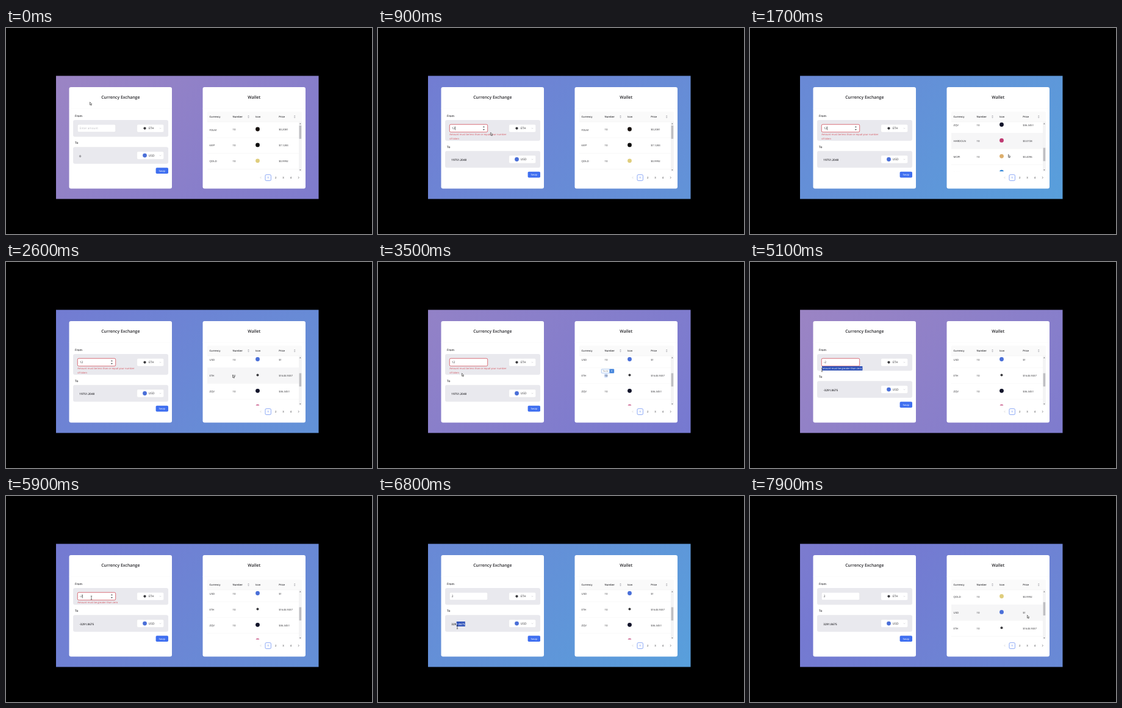
An HTML page with a canvas for the animation above (8000 ms loop, 600 px wide and 338 px high).

```html
<!DOCTYPE html>
<html lang="en">
<head>
<meta charset="utf-8">
<title>Currency Exchange</title>
<style>
html, body { margin: 0; width: 100%; height: 100%; overflow: hidden; background: #000; }
canvas { display: block; width: 600px; height: 338px; }
</style>
</head>
<body>
<canvas id="stage"></canvas>
<script>
const canvas = document.getElementById('stage');
const ctx = canvas.getContext('2d');
const dpr = window.devicePixelRatio || 1;
canvas.width = 600 * dpr;
canvas.height = 338 * dpr;

const LOOP = 8000, RATE = 1645.93373, ROW = 25.9;
const INK = '#2b2b2f', RED = '#d4505a', BLUE = '#3f6ff0', MARK = '#2f52b8';
const FONT = '"Open Sans", "Noto Sans", sans-serif';

// name, price, icon colour
const coins = [
  ['FOLM', '$0.2081', '#17100d'],
  ['kVIP', '$7.1283', '#0c0c0c'],
  ['QOLD', '$0.9992', '#dfcd7c'],
  ['USD', '$1', '#4a6fd8'],
  ['ETH', '$1645.9337', '#3a3a3e'],
  ['ZQV', '$36.3451', '#12142a'],
  ['HARDOLN', '$0.0728', '#bf3a72'],
  ['MOPI', '$0.4096', '#dcae6c'],
  ['TARV', '$0.5120', '#3487d6'],
  ['WIBEK', '$1.2040', '#6a6a78']
];

// time, x, y
const pointer = [
  [0, 138, 124], [120, 138, 124], [350, 140, 165], [800, 140, 167], [1200, 424, 210],
  [2400, 424, 210], [2620, 371, 187], [2760, 377, 187], [2950, 377, 187], [3450, 138, 185],
  [3550, 138, 185], [3800, 142, 166], [4450, 142, 166], [4700, 184, 175], [5060, 118, 177],
  [5200, 118, 177], [5650, 140, 167], [6120, 140, 167], [6400, 143, 211], [6780, 130, 215],
  [7080, 130, 215], [7550, 455, 198], [8000, 455, 198]
];
const scrolls = [[0, 0], [1250, 0], [1700, 137], [1950, 137], [2350, 84.2],
  [7580, 84.2], [7760, 53.3], [8000, 53.3]];
const typed = [[0, ''], [520, '1'], [620, '12'], [3950, '1'], [4050, ''],
  [4220, '-'], [4350, '-2'], [6050, '2']];
// click, last key, leave
const focuses = [[370, 620, 2640], [3820, 4350, 4700], [5700, 5700, 6400]];

function bezierEase(x) {
  let lo = 0, hi = 1, s = 0.5;
  for (let i = 0; i < 20; i++) {
    s = (lo + hi) / 2;
    const bx = 0.75 * s * (1 - s) ** 2 + 0.75 * s * s * (1 - s) + s ** 3;
    if (bx < x) lo = s; else hi = s;
  }
  return 0.3 * s * (1 - s) ** 2 + 3 * s * s * (1 - s) + s ** 3;
}

function track(keys, t, col, ease = k => k) {
  let i = 0;
  while (i < keys.length - 2 && t >= keys[i + 1][0]) i++;
  const a = keys[i], b = keys[i + 1];
  const k = Math.min(1, Math.max(0, (t - a[0]) / (b[0] - a[0])));
  return a[col] + (b[col] - a[col]) * ease(k);
}

const smooth = k => k * k * (3 - 2 * k);
const scrollAt = t => track(scrolls, t, 1);
const between = (t, a, b) => t >= a && t < b;

function box(x, y, w, h, r, fill, stroke, lw = 0.6) {
  ctx.beginPath();
  ctx.roundRect(x, y, w, h, r);
  if (fill) { ctx.fillStyle = fill; ctx.fill(); }
  if (stroke) { ctx.strokeStyle = stroke; ctx.lineWidth = lw; ctx.stroke(); }
}

function dot(x, y, r, color) {
  ctx.beginPath();
  ctx.arc(x, y, r, 0, Math.PI * 2);
  ctx.fillStyle = color;
  ctx.fill();
}

function text(s, x, y, size, color = INK, weight = 400, align = 'left') {
  ctx.font = `${weight} ${size}px ${FONT}`;
  ctx.textAlign = align;
  ctx.fillStyle = color;
  ctx.fillText(s, x, y + size * 0.355);
  return ctx.measureText(s).width;
}

function line(points, color, lw = 0.6) {
  ctx.beginPath();
  points.forEach(([x, y], i) => i ? ctx.lineTo(x, y) : ctx.moveTo(x, y));
  ctx.strokeStyle = color;
  ctx.lineWidth = lw;
  ctx.stroke();
}

// filled triangle, d = -1 up, 1 down
function arrow(x, y, r, d, color) {
  ctx.beginPath();
  ctx.moveTo(x - r, y - d * r * 0.5);
  ctx.lineTo(x + r, y - d * r * 0.5);
  ctx.lineTo(x, y + d * r * 0.7);
  ctx.fillStyle = color;
  ctx.fill();
}

function backdrop(t) {
  ctx.fillStyle = '#000';
  ctx.fillRect(0, 0, 600, 338);
  const p = t % 5100;
  const blue = p < 2100 ? bezierEase(p / 2100) : 1 - bezierEase(Math.min(1, (p - 2100) / 2500));
  const w = 430.5, h = 202, d = w + h;
  const cx = 82 + w * 2 - blue * w * 3, cy = 78.5 + h / 2;
  const g = ctx.createLinearGradient(cx - d, cy - d, cx + d, cy + d);
  g.addColorStop(0, '#a988bf');
  g.addColorStop(0.45, '#7579d1');
  g.addColorStop(1, '#4fabdf');
  ctx.fillStyle = g;
  ctx.fillRect(82, 78.5, w, h);
}

function card(x, title) {
  box(x, 97, 168.5, 166.5, 3, '#fff');
  line([[x, 132], [x + 168.5, 132]], '#f4f4f5', 0.5);
  text(title, x + 84.3, 113.5, 6.9, '#222226', 600, 'center');
}

function picker(y, name, color, r) {
  box(214.7, y, 44, 12.8, 2, '#fff', '#e0e0e4', 0.4);
  dot(227.5, y + 6.4, r, color);
  text(name, 233.8, y + 6.4, 4.8);
  line([[251.7, y + 5.8], [253, y + 7.1], [254.3, y + 5.8]], '#b5b5ba', 0.5);
}

function caret(t, x, focus) {
  if (!focus) return;
  const since = t - Math.max(focus[0], Math.min(t, focus[1]));
  if (Math.floor(since / 500) % 2 === 0) line([[x + 0.4, 161.6], [x + 0.4, 167.6]], '#222');
  arrow(173.4, 162.3, 1.6, -1, '#55555a');
  arrow(173.4, 166.9, 1.6, 1, '#55555a');
}

function exchange(t) {
  card(103.5, 'Currency Exchange');
  const value = typed.filter(k => t >= k[0]).pop()[1];
  const num = Number(value) || 0;
  const error = num > 10
    ? ['Amount must be less than or equal your number', 'of token']
    : num < 0 ? ['Amount must be greater than zero'] : [];
  const dy = error.length > 1 ? 6.4 : 0;
  const focus = focuses.find(f => between(t, f[0], f[2]));

  text('From', 113, 144, 4.8, INK, 600);
  box(110, 151, 156, 27.5 + dy, 3, '#e9e9ee');
  const edge = error.length ? RED : focus ? '#6f96f2' : '#dcdce0';
  box(117.3, 158.2, 62.4, 12.6, 2, '#fff', edge, error.length ? 0.8 : 0.5);
  if (!value) text('Enter amount', 120.8, 164.6, 4.7, '#bcbcc2');
  caret(t, 120.8 + text(value, 120.8, 164.6, 4.8), focus);
  picker(158.2, 'ETH', '#3a3a3e', 2.1);

  const drag = between(t, 4700, 5680) && num < 0;
  if (drag) {
    const x = Math.max(117.4, Math.min(184.3, track(pointer, Math.min(t, 5060), 1, smooth)));
    box(x, 171, 184.4 - x, 7, 0, MARK);
  }
  error.forEach((s, i) => {
    text(s, 117.2, 174.5 + i * 6.7, 4.1, drag ? '#f4f6ff' : RED);
  });

  text('To', 113, 188.5 + dy, 4.8, INK, 600);
  box(110, 195.3 + dy, 156, 27.5, 3, '#e9e9ee');
  const y = 210 + dy;
  const result = String(Number((num * RATE).toFixed(4)));
  const w = text(result, 120.3, y, 4.6, INK, 600);
  if (between(t, 6400, 7080)) {
    const x = Math.max(128.5, Math.min(120.3 + w, track(pointer, Math.min(t, 6780), 1, smooth) - 1.5));
    ctx.save();
    ctx.beginPath();
    ctx.rect(x, 206, 120.6 + w - x, 8);
    ctx.clip();
    box(x, 206, 30, 8, 0, MARK);
    text(result, 120.3, y, 4.6, '#f4f6ff', 600);
    ctx.restore();
  }
  picker(202.7 + dy, 'USD', '#4a6fd8', 3.4);
  box(245.6, 229.3 + dy, 20.4, 9.8, 1.8, BLUE);
  text('Swap', 255.8, 234.2 + dy, 4.2, '#fff', 400, 'center');
}

function wallet(t, px, py) {
  card(322.5, 'Wallet');
  const s = scrollAt(t);
  const inside = px > 330 && px < 480 && py > 154 && py < 235;
  const hover = inside ? Math.floor((py + scrollAt(t - 120) - 154) / ROW) : -1;

  ctx.save();
  ctx.beginPath();
  ctx.rect(330, 154, 155, 81.3);
  ctx.clip();
  coins.forEach(([name, price, color], i) => {
    const y = 167 + i * ROW - s;
    if (i === hover) box(330, y - 13, 150, ROW, 0, '#f6f6f7');
    line([[330, y + 12.9], [480, y + 12.9]], '#f0f0f1', 0.5);
    if (i === 4 && between(t, 2640, 3820)) {
      const w = Math.min(5, Math.max(0, track(pointer, Math.min(t, 2760), 1, smooth) - 371.3));
      box(371.3, y - 3, w, 6, 0, '#c3d6f8');
    }
    text(name, 333.5, y, 4.3);
    text('10', 371.5, y, 4.2);
    dot(412.5, y - 1, name === 'ETH' ? 2 : 3.4, color);
    text(price, 447.2, y, 4.2);
  });
  ctx.restore();

  box(330, 137.3, 155, 16.8, [2, 2, 0, 0], '#fafafa');
  line([[330, 154], [485, 154]], '#ececee', 0.5);
  [['Currency', 333.5], ['Number', 371.5], ['Icon', 409], ['Price', 447.2]].forEach(([h, x]) =>
    text(h, x, 145.6, 4.1, INK, 600));
  for (const x of [397.5, 473.2]) {
    arrow(x, 144.2, 1.4, -1, '#aaaab0');
    arrow(x, 147, 1.4, 1, '#aaaab0');
  }

  box(480, 154, 4.8, 81.3, 0, '#f3f3f4');
  box(480.6, 160 + s * 0.267, 3.6, 21.8, 0, '#bfbfc3');
  arrow(482.4, 157, 1.3, -1, '#77777c');
  arrow(482.4, 233, 1.3, 1, '#77777c');

  if (between(t, 2850, 3820)) {
    box(366.3, 175.8, 20.6, 6.4, 0.6, '#fff', '#5c93dc', 0.5);
    box(379.4, 175.8, 7.5, 6.4, 0.6, '#4384dc');
    text('Tra từ', 372.8, 179, 3.3, '#56606e', 400, 'center');
    arrow(383.1, 179, 1.3, 1, '#dbe8fb');
  }

  line([[418.4, 243.9], [416.9, 245.5], [418.4, 247.1]], '#c4c4c8');
  box(425, 240.7, 9.4, 9.8, 1.8, '#fff', BLUE);
  text('1', 429.7, 245.6, 4.3, BLUE, 600, 'center');
  ['2', '3', '4'].forEach((n, i) => text(n, 442.2 + i * 12.4, 245.6, 4.3, INK, 400, 'center'));
  line([[478.9, 243.9], [480.4, 245.5], [478.9, 247.1]], '#55555a');
}

function cursor(t, x, y) {
  const inField = x > 117 && x < 180 && y > 158 && y < 171;
  const beam = inField || between(t, 2640, 2950) || between(t, 4680, 5250) || between(t, 6380, 7100);
  if (beam) {
    line([[x, y - 2.8], [x, y + 2.8]], '#222');
    for (const d of [-2.8, 2.8]) line([[x - 1.2, y + d], [x + 1.2, y + d]], '#222');
    return;
  }
  const shape = [[0, 0], [0, 4.6], [1.1, 3.7], [1.9, 5.4], [2.7, 5], [1.9, 3.4], [3.3, 3.3]];
  ctx.beginPath();
  shape.forEach(([a, b]) => ctx.lineTo(x - 0.5 + a, y - 2.4 + b));
  ctx.closePath();
  ctx.fillStyle = '#fff';
  ctx.fill();
  ctx.strokeStyle = '#222';
  ctx.lineWidth = 0.6;
  ctx.stroke();
}

function draw(t) {
  ctx.setTransform(dpr, 0, 0, dpr, 0, 0);
  ctx.textRendering = 'geometricPrecision';
  const x = track(pointer, t, 1, smooth), y = track(pointer, t, 2, smooth);
  backdrop(t);
  exchange(t);
  wallet(t, x, y);
  cursor(t, x, y);
}

const start = performance.now();
function tick(now) {
  draw(Math.max(0, now - start) % LOOP);
  requestAnimationFrame(tick);
}
draw(0);
requestAnimationFrame(tick);
</script>
</body>
</html>
```
